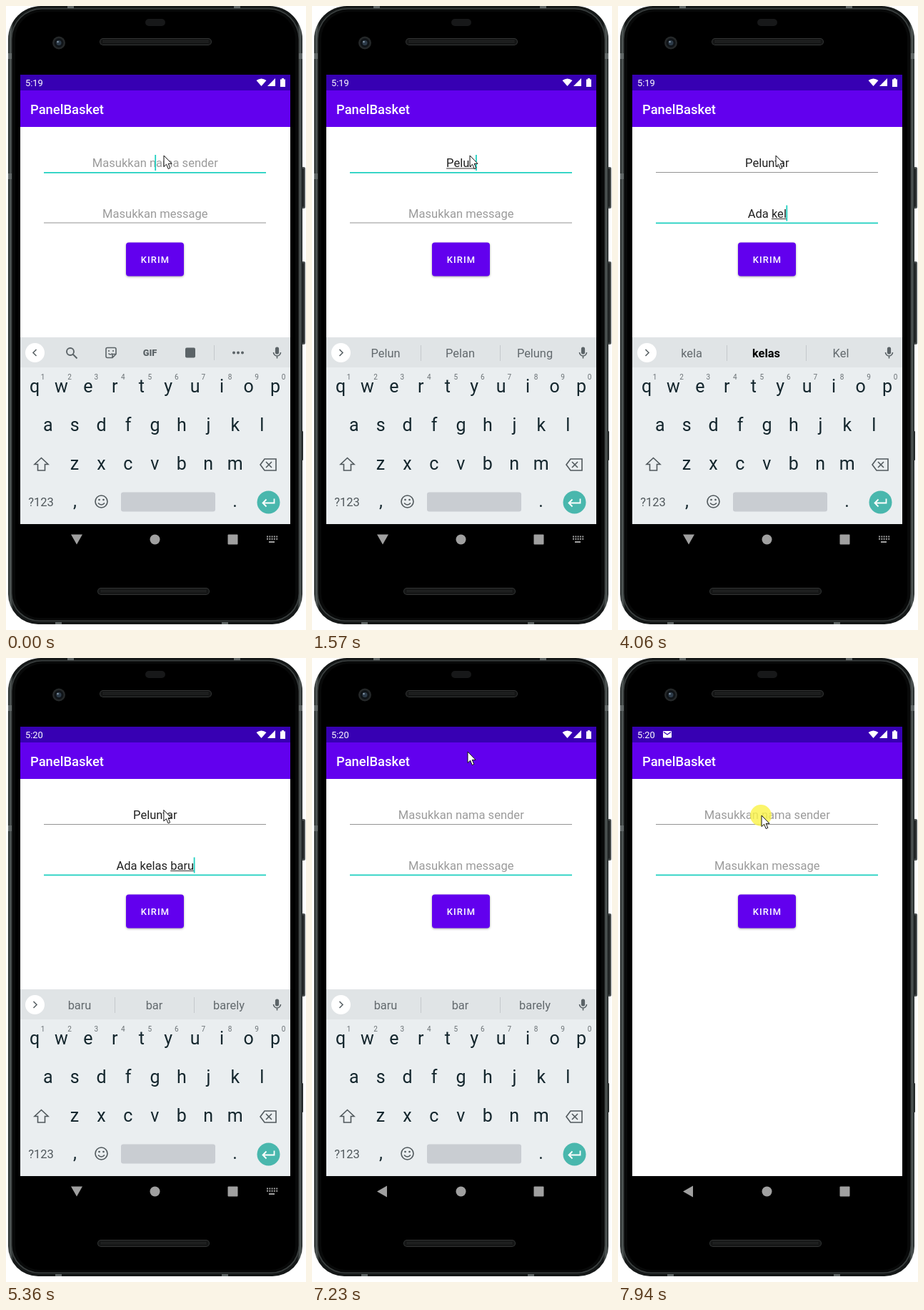
Write an HTML page with a canvas that moves like this. It is 420 px wide and 872 px high and loops after 8 s.

```html
<!DOCTYPE html>
<html lang="id">
<head>
<meta charset="utf-8">
<style>
html, body { margin: 0; width: 420px; height: 872px; overflow: hidden; background: #fff; }
canvas { display: block; }
</style>
</head>
<body>
<canvas id="stage" width="420" height="872"></canvas>
<script>
const ctx = document.getElementById('stage').getContext('2d');
const LOOP = 8000, MID = 208.8, TEAL = '#1fd0c0', PURPLE = '#6200ee';
const SENDER = 'Peluntar';

// [time, text in the focused field, suggestions ('*' = bold), start of caret blink]
const steps = [
  [0, '', '', -10],
  [880, 'P', ''],
  [960, 'P', 'P Pada Pak'],
  [1120, 'Pe', 'Pe Per Pergi'],
  [1270, 'Pel', 'Pel Pelan Pela'],
  [1420, 'Pelu', 'Pelu Peluk Peluh'],
  [1570, 'Pelun', 'Pelun Pelan Pelung'],
  [1660, 'Pelunt', 'Pelunt Peluit Pelantik'],
  [1890, 'Pelunta', 'Pelunta Pelita Pelantik'],
  [2120, SENDER, SENDER + ' Pelatar Pelantik'],
  [2750, '', ''],
  [2840, 'A', 'A Aku Ada'],
  [2990, 'Ad', 'Ad Ada Adalah'],
  [3140, 'Ada', 'Ada Adanya Adalah'],
  [3390, 'Ada ', 'yang apa di', 3090],
  [3740, 'Ada k', 'k ke kamu'],
  [3910, 'Ada ke', 'ke *ke kek'],
  [4060, 'Ada kel', 'kela *kelas Kel'],
  [4210, 'Ada kela', 'kela *kelas kelak'],
  [4290, 'Ada kelas', 'kelas kela kelasi'],
  [4520, 'Ada kelas ', 'yang baru di'],
  [4750, 'Ada kelas b', 'b baru bisa'],
  [4825, 'Ada kelas ba', 'ba baru bagi'],
  [4900, 'Ada kelas baru', 'baru bar barely', 5020],
  [6520, '', 'baru bar barely']
];

const pointerPath = [
  [5283, 221, 209], [6130, 215, 357], [6834, 215, 357], [7229, 218, 131],
  [7624, 178, 280], [7782, 200, 105], [7940, 201, 220]
];

const ease = p => p * p * (3 - 2 * p);
const clamp = v => Math.max(0, Math.min(1, v));

function heldTime(t) {
  const [start, step] = t < 6913 ? [5360, 77] : [6913, 79];
  return start + Math.floor((t - start) / step) * step;
}

function pointerAt(t) {
  let from = pointerPath[0];
  for (const to of pointerPath) {
    if (t <= to[0]) {
      const p = ease(clamp((t - from[0]) / (to[0] - from[0] || 1)));
      return [from[1] + (to[1] - from[1]) * p, from[2] + (to[2] - from[2]) * p];
    }
    from = to;
  }
  return from.slice(1);
}

function box(x, y, w, h, fill, r = 0) {
  ctx.fillStyle = fill;
  ctx.beginPath();
  ctx.roundRect(x, y, w, h, r);
  ctx.fill();
}

function disc(x, y, r, fill) {
  ctx.fillStyle = fill;
  ctx.beginPath();
  ctx.arc(x, y, r, 0, 7);
  ctx.fill();
}

function text(str, x, y, size, fill, align = 'center', weight = 400) {
  ctx.font = `${weight} ${size}px Roboto, sans-serif`;
  ctx.textAlign = align;
  ctx.fillStyle = fill;
  ctx.fillText(str, x, y);
}

function icon(x, y, d, { fill, stroke, width = 1.6 }) {
  const shape = new Path2D(d);
  ctx.save();
  ctx.translate(x, y);
  if (fill) { ctx.fillStyle = fill; ctx.fill(shape); }
  if (stroke) { ctx.strokeStyle = stroke; ctx.lineWidth = width; ctx.stroke(shape); }
  ctx.restore();
}

function speaker(x, y) {
  box(x, y, 157, 10, '#333535', 5);
  box(x + 1, y + 1, 155, 8, '#151616', 4);
  ctx.setLineDash([1, 1]);
  for (const row of [3.5, 5.5]) icon(x + 5, y + row, 'M0 0H147', { stroke: '#343636', width: 1 });
  ctx.setLineDash([]);
}

function phone() {
  ctx.fillStyle = '#fff';
  ctx.fillRect(0, 0, 420, 872);
  for (const [y, h] of [[225, 58], [357, 116]]) {
    box(412, y, 7, h, '#4b5050', 2);
    box(415, y + 2, 2, h - 4, '#1d2020', 1);
  }
  box(412, 594, 4, 41, '#252929', 1);
  const edge = ctx.createLinearGradient(3, 0, 415, 0);
  [[0, '#1e2222'], [.008, '#555c5b'], [.018, '#151818'], [.982, '#151818'], [.992, '#555c5b'], [1, '#1e2222']]
    .forEach(([at, color]) => edge.addColorStop(at, color));
  box(3, 0, 412, 864, edge, [46, 46, 42, 42]);
  box(7, 3, 404, 857, '#3a3f3f', [43, 43, 39, 39]);
  box(8.5, 4.5, 401, 854, '#080909', [42, 42, 38, 38]);
  box(13, 8, 392, 847, '#000', [38, 38, 34, 34]);
  for (const y of [66, 234]) box(3, y, 5, 8, '#626868');
  box(410, 66, 5, 8, '#626868');
  for (const x of [86, 319]) { box(x, 0, 9, 3, '#626868'); box(x - 17, 861, 9, 3, '#626868'); }
  box(195, 18, 28, 10, '#171819', 5);
  disc(74, 51.5, 9, '#252829');
  disc(74, 51.5, 6.5, '#101418');
  disc(74, 51.5, 3.5, '#2d3b49');
  disc(72.5, 50, 1.3, '#8496a8');
  speaker(131, 45);
  speaker(128, 813);
}

function bars(t) {
  box(20, 96, 378, 22, '#3700b3');
  box(20, 118, 378, 51, PURPLE);
  text(t < 4825 ? '5:19' : '5:20', 27, 111.5, 12.9, '#fff', 'left');
  text('PanelBasket', 34, 150.5, 18.4, '#fff', 'left', 500);
  if (t >= 7466) {
    box(63, 102, 12, 9.5, '#fff', 1);
    icon(64, 103.5, 'M0 0L5 3.5L10 0', { stroke: '#3700b3', width: 1.3 });
  }
  icon(357.5, 112, 'M0 0L-7-8Q0-13 7-8Z', { fill: '#fff' });
  icon(366, 112, 'M0 0H11V-11Z', { fill: '#fff' });
  icon(384, 101, 'M2 0H5V1.5H7V12H0V1.5H2Z', { fill: '#fff' });
}

function field(value, hint, y, focused, caret, composing) {
  if (focused) box(53, y + 7, 311, 1.8, TEAL);
  else box(53, y + 7, 311, 1, '#949494');
  text(value || hint, MID, y, 16.55, value ? '#212121' : '#9b9b9b');
  const width = value ? ctx.measureText(value).width : 0;
  const right = MID + width / 2;
  if (composing && !value.endsWith(' ')) {
    const word = ctx.measureText(value.split(' ').pop()).width;
    box(right - word, y + 1.5, word, 1, '#333');
  }
  if (caret) box(right - .5, y - 17, 1.8, 22, TEAL);
}

function button(t) {
  const press = t >= 6130 && t < 6600;
  ctx.save();
  ctx.shadowColor = 'rgba(0,0,0,.35)';
  ctx.shadowBlur = press ? 9 : 3;
  ctx.shadowOffsetY = press ? 4 : 1;
  box(168, 330.5, 81, 47, PURPLE, 4);
  ctx.restore();
  if (press) box(168, 330.5, 81, 47, `rgba(255,255,255,${t < 6210 || t >= 6520 ? .12 : .22})`, 4);
  ctx.letterSpacing = '1.15px';
  text('KIRIM', 209, 359, 12.9, '#fff', 'center', 500);
  ctx.letterSpacing = '0px';
}

function strip(words) {
  const gray = '#5b6367', line = { stroke: gray };
  box(20, 463, 378, 42, '#e0e4e6');
  disc(40.5, 484.5, 13.5, '#fff');
  icon(40.5, 484.5, words ? 'M-2-4.5L2.5 0L-2 4.5' : 'M2-4.5L-2.5 0L2 4.5', line);
  icon(379.5, 484, 'M-2.6-5A2.6 2.6 0 0 1 2.6-5V0A2.6 2.6 0 0 1-2.6 0Z', { fill: gray });
  icon(379.5, 484, 'M-5 0A5 5 0 0 0 5 0M0 5V8.5', line);
  if (words) {
    words.split(' ').forEach((word, i) => {
      const bold = word[0] === '*';
      text(bold ? word.slice(1) : word, 103 + 104.5 * i, 491, 16.4, bold ? '#000' : '#62696d', 'center', bold ? 700 : 400);
    });
    for (const x of [152, 263]) box(x, 474, 1, 22, '#c4c9cc');
    return;
  }
  icon(90, 483, 'M5 0A5 5 0 1 1-5 0A5 5 0 1 1 5 0M3.5 3.5L9.5 9.5', { stroke: gray, width: 1.9 });
  icon(147, 484.5, 'M-5-7H5Q7-7 7-5V2L2 7H-5Q-7 7-7 5V-5Q-7-7-5-7M7 2H3Q2 2 2 3V7M-3.5 1Q-1 4 2 1M-3-3.5V-1.5M3-3.5V-1.5', line);
  text('GIF', 201.5, 489, 12.8, gray, 'center', 900);
  box(251, 477.5, 14, 14, gray, 2);
  box(291, 474, 1, 21, '#c4c9cc');
  for (const x of [319, 325, 331]) disc(x, 484.5, 2, gray);
}

function keyboard(words, upper) {
  const ink = '#14262d', gray = '#50585c', line = { stroke: gray };
  box(20, 463, 378, 261, '#eaeef0');
  strip(words);
  [['qwertyuiop', 40, 539.5], ['asdfghjkl', 58.7, 593.5], ['zxcvbnm', 96, 647.5]].forEach(([row, x, y], r) => {
    [...row].forEach((key, i) => {
      text(upper ? key.toUpperCase() : key, x + 37.45 * i, y, 25, ink);
      if (!r) text((i + 1) % 10, 51.5 + 37.45 * i, 521.5, 10, '#6a7175');
    });
  });
  icon(49.5, 640.5, 'M0-9L9.5 0H5V8.5H-5V0H-9.5Z', { stroke: gray, fill: upper && gray });
  icon(367, 641, 'M-11 0L-5-8H11V8H-5ZM-3-4L5 4M5-4L-3 4', line);
  text('?123', 49, 699, 16.5, gray);
  text(',', 96.5, 699.5, 25, ink);
  text('.', 320.5, 699.5, 25, ink);
  icon(133.5, 692.5, 'M8.5 0A8.5 8.5 0 1 1-8.5 0A8.5 8.5 0 1 1 8.5 0M-4.5 2Q0 7 4.5 2', line);
  disc(130.5, 690, 1.3, gray);
  disc(136.5, 690, 1.3, gray);
  box(161, 679.5, 132, 27, '#c9cdd2', 3);
  disc(367.5, 693.5, 16, '#49b7ad');
  icon(367.5, 693.5, 'M8-5V1H-7M-3-4L-8 1L-3 6', { stroke: '#fff', width: 1.8 });
}

function navigation(hiding) {
  const gray = '#a0a0a0';
  box(20, 724, 378, 44, '#000');
  icon(99, 745.5, hiding ? 'M-8 0L6-8V8Z' : 'M-8-7H8L0 7Z', { fill: gray });
  disc(208.5, 745.5, 7, gray);
  box(310.5, 738.5, 14, 14, gray, 1);
  if (hiding) return;
  for (let i = 0; i < 10; i++) box(365 + i % 5 * 3.3, 740.5 + Math.floor(i / 5) * 3.3, 2, 2, gray);
  box(368, 748, 8, 2, gray);
}

function pointer(t) {
  const [x, y] = pointerAt(t);
  if (t >= 7782) disc(200, y, 15, 'rgba(250,242,70,.8)');
  icon(x, y, 'M0 0V15.5L3.6 12.2L6.2 18.5L8.8 17.4L6.2 11.3H11Z', { fill: '#fff', stroke: '#111', width: 1 });
}

function draw(t) {
  const [time, value, words, blink = time] = steps.findLast(s => s[0] <= t);
  const held = heldTime(t);
  const onMessage = t >= 2440, sent = t >= 6520;
  const message = t >= 2750 ? value : '';
  const caret = (t - blink) % 1000 < 500;
  phone();
  box(20, 96, 378, 628, '#fff');
  bars(t);
  field(onMessage ? (sent ? '' : SENDER) : value, 'Masukkan nama sender', 225,
    !onMessage, !onMessage && caret, !onMessage && value);
  field(message, 'Masukkan message', 295.5, onMessage, message && caret, message);
  button(t);

  const slide = ease(clamp((held - 7229) / 316));
  if (slide < 1) {
    ctx.save();
    ctx.beginPath();
    ctx.rect(20, 463, 378, 261);
    ctx.clip();
    ctx.translate(0, 261 * slide);
    keyboard(words, t >= 730 && t < 880);
    ctx.restore();
  }
  navigation(t >= 7150);
  pointer(held);
}

function frame(now) {
  draw(now % LOOP);
  requestAnimationFrame(frame);
}
requestAnimationFrame(frame);
</script>
</body>
</html>
```
